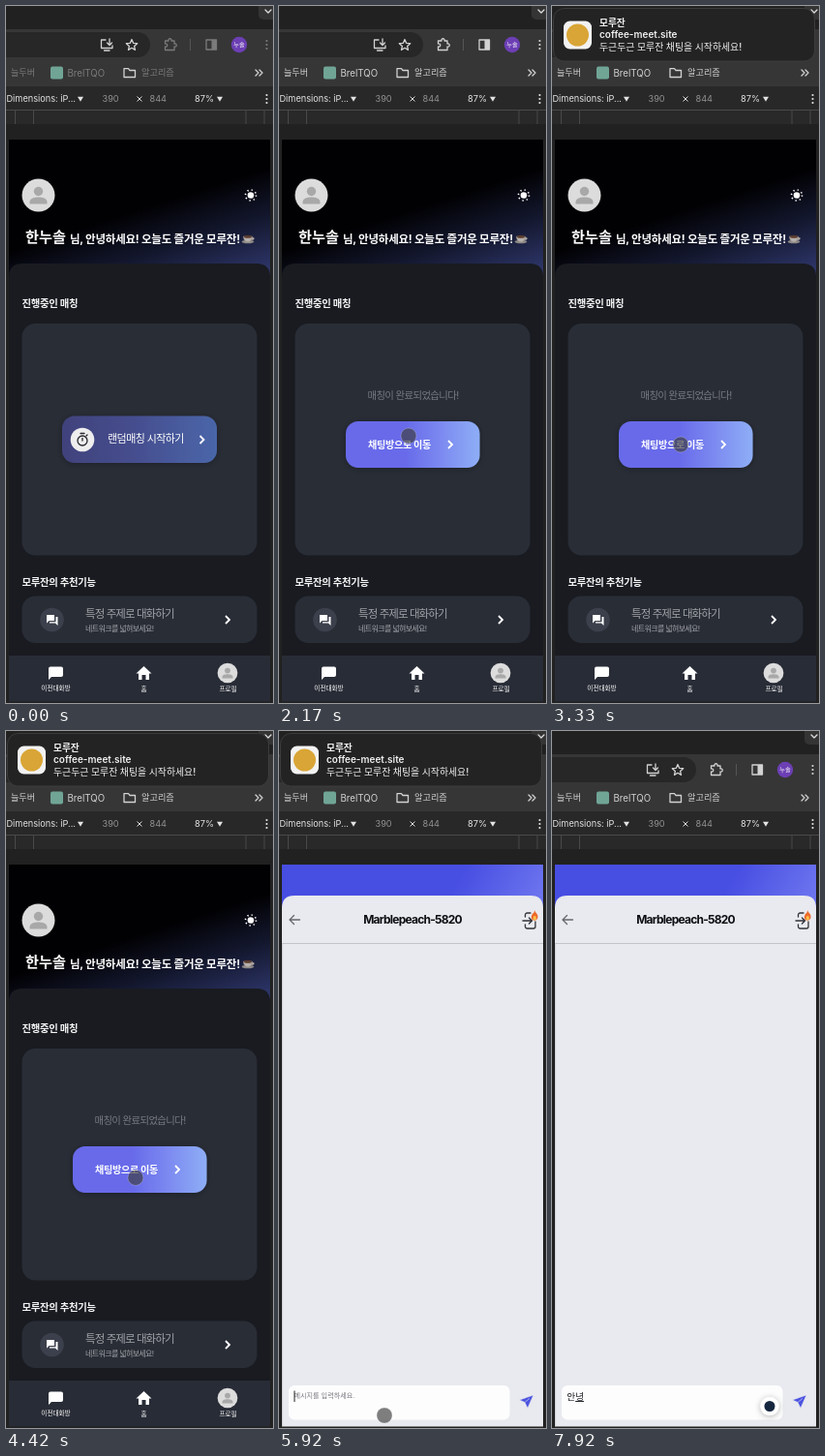
Recreate the animation shown at these times as an HTML page. Size 276x720 px, loop 8000 ms.

```html
<!DOCTYPE html>
<html lang="ko">
<head>
<meta charset="utf-8">
<style>
html, body { margin: 0; width: 100%; height: 100%; overflow: hidden; background: #212121; }
svg { display: block; width: 276px; height: 720px; font-family: Inter, 'Noto Sans CJK KR', 'Noto Sans CJK JP', sans-serif; --tool: #d2d2d2; }
svg.inactive { --tool: #7b7b7b; }
.tool { fill: var(--tool); }
.toolLine { stroke: var(--tool); }
.line { fill: none; stroke-width: 1.3; stroke-linejoin: round; stroke-linecap: round; }
.b { font-weight: 700; }
.m { font-weight: 500; }
.tight { letter-spacing: -.05em; }
.tighter { letter-spacing: -.08em; }
</style>
</head>
<body>
<svg id="stage" viewBox="0 0 276 720">
  <defs>
    <linearGradient id="night" gradientUnits="userSpaceOnUse" x1="100" y1="222" x2="130" y2="315">
      <stop stop-color="#010103"/><stop offset=".5" stop-color="#14182f"/><stop offset="1" stop-color="#2c3466"/>
    </linearGradient>
    <linearGradient id="day" gradientUnits="userSpaceOnUse" x1="170" y1="138" x2="262" y2="190">
      <stop offset=".2" stop-color="#474ee2"/><stop offset="1" stop-color="#6d75ef"/>
    </linearGradient>
    <linearGradient id="startFill"><stop stop-color="#41427c"/><stop offset=".5" stop-color="#454f90"/><stop offset="1" stop-color="#4a66a9"/></linearGradient>
    <linearGradient id="moveFill"><stop offset=".45" stop-color="#686bea"/><stop offset=".7" stop-color="#7b88f0"/><stop offset="1" stop-color="#8eaef6"/></linearGradient>
    <filter id="soft" x="-30%" y="-30%" width="160%" height="160%"><feDropShadow dx="0" dy="1" stdDeviation="3" flood-opacity=".3"/></filter>
    <g id="person">
      <circle r="17" fill="#dcdcdc"/><circle cy="-4" r="4.7" fill="#a8a8a8"/>
      <path d="M-9 9V7C-9 3-4 2 0 2S9 3 9 7V9Z" fill="#a8a8a8"/>
    </g>
    <path id="chevron" d="M-2-4L2 0L-2 4" fill="none" stroke="#fff" stroke-width="1.8"/>
    <path id="down" d="M-3-2.3H3L0 2.7Z"/>
    <g id="kebab"><circle cy="-4" r="1.1"/><circle r="1.1"/><circle cy="4" r="1.1"/></g>
  </defs>

  <!-- browser window -->
  <rect width="276" height="720" fill="#212121"/>
  <rect y="24" width="276" height="59" fill="#363636"/>
  <rect x="-30" y="27" width="179" height="26" rx="13" fill="#272727"/>
  <rect x="261" y="-6" width="22" height="20" rx="5" fill="#343434"/>
  <path class="line" d="M268 4L271 7L274 4" stroke="#ddd"/>
  <g class="line" stroke="#d2d2d2">
    <path d="M103 35H98.500V43.500H110V41M101.500 46H107M107 34V40M104.500 38L107 40.500L109.500 38"/>
    <path d="M130 34.500L131.600 38.300L135.700 38.700L132.600 41.400L133.500 45.400L130 43.300L126.500 45.400L127.400 41.400L124.300 38.700L128.400 38.300Z"/>
    <path d="M122 65V73.500H133.500V66.500H128L126.500 64.700H122Z"/>
    <path d="M258 66L261 69L258 72M262 66L265 69L262 72"/>
  </g>
  <g class="line toolLine">
    <path d="M164.500 36H168C167 33 172 33 171 36H174V39C177 38 177 43 174 42V45.500H164.500V42C167.500 42.500 167.500 38.500 164.500 39Z"/>
    <rect x="207" y="35" width="10.500" height="10"/>
  </g>
  <rect class="tool" x="212.500" y="35" width="5" height="10"/>
  <path d="M190.500 34V46" stroke="#555"/>
  <circle cx="241" cy="40" r="8.200" fill="#6c3fb4"/>
  <text class="m" x="241" y="42.300" font-size="6.200" fill="#fff" text-anchor="middle">누솔</text>
  <use class="tool" href="#kebab" x="269.500" y="40"/>
  <text class="tool" x="5" y="72.400" font-size="9.100">늘두버</text>
  <rect x="46" y="62.500" width="13" height="13" rx="2" fill="#70a596"/>
  <text class="tool" x="63.500" y="72.500" font-size="9.700">BrelTQO</text>
  <text class="tool" x="140" y="72.400" font-size="9.200">알고리즘</text>

  <rect y="83" width="276" height="24" fill="#282828"/>
  <g font-size="9.200" fill="#e4e4e4">
    <text x="72" y="99.300" text-anchor="end">Dimensions: iP...</text>
    <g fill="#929292"><text x="99.500" y="99.300">390</text><text x="148.500" y="99.300">844</text></g>
    <text x="195" y="99.300">87%</text>
    <path d="M135.500 93.500L140.500 98.500M140.500 93.500L135.500 98.500" stroke="#ddd"/>
    <use href="#down" x="77" y="96"/><use href="#down" x="221" y="96"/><use href="#kebab" x="269.500" y="96"/>
  </g>
  <rect y="107" width="276" height="15" fill="#292929"/>
  <path d="M0 107.500H276M9.500 107V122M28.500 107V122M248 107V122M267 107V122" stroke="#494949"/>

  <!-- home page -->
  <g id="home">
    <rect x="3" y="138" width="270" height="150" fill="url(#night)"/>
    <use href="#person" x="33.500" y="195.500"/>
    <circle cx="253" cy="195.500" r="3.300" fill="#fff"/>
    <circle cx="253" cy="195.500" r="5.500" fill="none" stroke="#fff" stroke-width="1.600" stroke-dasharray="1.300 3.020"/>
    <text class="b" x="20" y="243.700" font-size="15.200" fill="#fff">한누솔</text>
    <text class="b" x="66" y="244.500" font-size="11.500" fill="#fff" letter-spacing="-.02em">님, 안녕하세요! 오늘도 즐거운 모루잔!</text>
    <ellipse cx="250" cy="243.500" rx="6.300" ry="1.700" fill="#8f8a87"/>
    <path d="M245.500 238H254.500C254.500 246 245.500 246 245.500 238ZM254 239C258 239 257 242 253 242" fill="#b5afab" stroke="#8a8480" stroke-width=".6"/>
    <ellipse cx="250" cy="238.200" rx="4" ry="1.500" fill="#5a3c2e"/>
    <path d="M3 718V280Q3 266 17 266H259Q273 266 273 280V718Z" fill="#191b21"/>
    <g class="b" font-size="10.400" fill="#f4f4f4" letter-spacing="-.03em">
      <text x="16.500" y="311">진행중인 매칭</text>
      <text x="16.500" y="598.500">모루잔의 추천기능</text>
    </g>
    <rect x="16.500" y="328" width="243" height="239.500" rx="14" fill="#292d36"/>
    <g id="start">
      <rect x="58" y="423.500" width="160" height="48.500" rx="13" fill="url(#startFill)" filter="url(#soft)"/>
      <circle cx="79" cy="448" r="12.300" fill="#eee"/>
      <g class="line" stroke="#25272d"><circle cx="79" cy="449" r="5"/><path d="M77 441.500H81M79 446.500V449M83 444L84 443"/></g>
      <text class="m tight" x="105" y="451.200" font-size="11" fill="#fff">랜덤매칭 시작하기</text>
      <use href="#chevron" x="202.500" y="448"/>
    </g>
    <g id="done">
      <text x="138.500" y="406" font-size="10.400" letter-spacing="-.06em" fill="#787b81" text-anchor="middle">매칭이 완료되었습니다!</text>
      <rect x="69" y="429" width="138.500" height="48" rx="13" fill="url(#moveFill)" filter="url(#soft)"/>
      <text class="b" x="92" y="457" font-size="10.100" letter-spacing="-.03em" fill="#fff">채팅방으로 이동</text>
      <use href="#chevron" x="177" y="453"/>
    </g>
    <rect x="16.500" y="609.500" width="243" height="48.500" rx="14" fill="#292d36"/>
    <circle cx="47.500" cy="634" r="12.300" fill="#3c404c"/>
    <path d="M42 629H50V635H44.500L42 637.500ZM51.500 631H53.500V640L51 637.500H45V636.300H51.500Z" fill="#fff"/>
    <text class="tighter" x="82" y="632.300" font-size="11.500" fill="#a0a2a6">특정 주제로 대화하기</text>
    <text class="tighter" x="82" y="646" font-size="8" fill="#a0a2a6">네트워크를 넓혀보세요!</text>
    <use href="#chevron" x="229" y="634"/>
    <rect x="3" y="671" width="270" height="47.500" fill="#282c36"/>
    <path d="M46 682.500H57Q59 682.500 59 684.500V691Q59 693 57 693H47L44 696V684.500Q44 682.500 46 682.500ZM142.500 682L150.500 689.500H148V696H144.500V691H140.500V696H137V689.500H134.500Z" fill="#fff"/>
    <use href="#person" transform="translate(229 689) scale(.61)"/>
    <g class="m" font-size="6.600" fill="#fff" text-anchor="middle">
      <text x="51.500" y="707.300">이전대화방</text><text x="142.500" y="707.500">홈</text><text x="229.500" y="708.300">프로필</text>
    </g>
  </g>

  <!-- chat page -->
  <g id="chat">
    <rect x="3" y="138" width="270" height="60" fill="url(#day)"/>
    <path d="M3 718.500V183Q3 170 16 170H260Q273 170 273 183V718.500Z" fill="#e9eaef"/>
    <path d="M3 219.500H273" stroke="#c3c4ca"/>
    <path d="M3.500 220V718" stroke="#d3d4d9"/>
    <path class="line" d="M21.500 195H11.500M15.500 190.500L11 195L15.500 199.500" stroke="#66686e"/>
    <text class="b" x="138" y="199.300" font-size="12" letter-spacing="-.065em" fill="#0d0e12" text-anchor="middle">Marblepeach-5820</text>
    <path class="line" d="M254.500 192V190Q254.500 188 256.500 188H260M265 197V202Q265 204 263 204H256.500Q254.500 204 254.500 202V200M252 196H261.500M258.500 193L261.500 196L258.500 199" stroke="#303238" stroke-width="1.500"/>
    <path d="M264 185C265 188 268 188.500 267.500 192.500C267 197 260.500 196.500 260.800 192C261 190 262 190 262 188.500C263 189 264 187.500 264 185Z" fill="#ee6a2b"/>
    <ellipse cx="264.300" cy="193.300" rx="1.600" ry="2.200" fill="#fac04a"/>
    <rect x="10" y="676" width="228.500" height="35.500" rx="6" fill="#fdfdfe"/>
    <path d="M263 686L248.500 691L254 693.500L257 699.500ZM254 693.500L259 689.500" fill="#4c53e0" stroke="#e9eaef" stroke-width=".6"/>
    <text id="hint" x="15.500" y="688.800" font-size="7.100" fill="#77787d">메시지를 입력하세요.</text>
    <path id="caret" d="M16 681.500V693" stroke="#222"/>
    <text x="15.300" y="691" font-size="9.600" fill="#1b1c20"><tspan id="typed"></tspan><tspan id="composing" text-decoration="underline"></tspan></text>
    <g id="helper">
      <circle cx="225" cy="697.500" r="9.500" fill="#fff" filter="url(#soft)"/>
      <circle cx="225" cy="697.500" r="5.500" fill="#14273f"/>
    </g>
    <g id="status">
      <path d="M2 720V703H88Q92 703 92 707V720Z" fill="#202124"/>
      <text x="7" y="714.300" font-size="9.100" fill="#e4e4e4">요청을 처리하는 중...</text>
    </g>
  </g>

  <!-- notification banner -->
  <g id="banner">
    <rect x="1.500" y="2.500" width="270" height="54.500" rx="11" fill="#232324" stroke="#3c3c3e"/>
    <rect x="12" y="15.500" width="29" height="29" rx="6.500" fill="#f2f2f2"/>
    <circle cx="26.500" cy="30" r="11.500" fill="#d9a536"/>
    <g fill="#f1f1f1">
      <text class="b" x="49" y="20.600" font-size="9.700">모루잔</text>
      <text x="49" y="33.400" font-size="10" font-weight="600">coffee-meet.site</text>
      <text class="m" x="49" y="45.700" font-size="9.900">두근두근 모루잔 채팅을 시작하세요!</text>
    </g>
  </g>

  <path id="arrow" d="M0 0V11.500L2.700 9L4.600 13.300L6.700 12.400L4.800 8.300H8.400Z" fill="#000" stroke="#fff"/>
  <circle id="touch" r="8" fill="#3c3c3c" fill-opacity=".66" stroke="#fff" stroke-opacity=".22"/>
</svg>
<script>
const LOOP = 8000;
const el = id => document.getElementById(id);
const show = (id, on) => { el(id).style.display = on ? '' : 'none'; };
const place = (id, x, y) => el(id).setAttribute('transform', `translate(${x} ${y})`);
const clamp = v => Math.min(1, Math.max(0, v));
const progress = (t, from, to) => clamp((t - from) / (to - from));
const smooth = p => p * p * (3 - 2 * p);

const ACTIVATE = 1300, MATCHED = 1600, OPEN_CHAT = 4500, FOCUS = 5700, TYPE = 6900, HIDE_POINTER = 6350;

// [time, x, y]
const pointer = [
  [450, 148, 476], [950, 141, 451], [1350, 141, 451], [2000, 134, 444], [2400, 134, 444],
  [3200, 133, 453], [4000, 133, 453], [4500, 134, 462], [5000, 134, 462], [5600, 109, 707], [8000, 109, 707]
];
// [time, committed text, syllable being composed]
const typing = [
  [0, '', ''], [TYPE, '', 'ㅇ'], [7050, '', '아'], [7200, '', '안'],
  [7400, '안', 'ㄴ'], [7580, '안', '녀'], [7750, '안', '녕']
];

function pointerAt(t) {
  const i = Math.max(1, pointer.findIndex(p => p[0] >= t));
  const [t0, x0, y0] = pointer[i - 1], [t1, x1, y1] = pointer[i];
  const p = smooth(progress(t, t0, t1));
  return [x0 + (x1 - x0) * p, y0 + (y1 - y0) * p];
}

function draw(t) {
  el('stage').classList.toggle('inactive', t < ACTIVATE);
  show('home', t < OPEN_CHAT);
  show('start', t < MATCHED);
  show('done', t >= MATCHED);

  show('chat', t >= OPEN_CHAT);
  show('status', t < 5400);
  show('helper', t >= HIDE_POINTER);
  show('hint', t < TYPE);
  show('caret', t >= FOCUS && t < TYPE && (t - FOCUS) % 1000 < 500);
  const [, committed, composing] = typing.filter(k => k[0] <= t).pop();
  el('typed').textContent = committed;
  el('composing').textContent = composing;

  const enter = 1 - (1 - progress(t, 2780, 3220)) ** 3;
  const leave = progress(t, 7600, 7880) ** 2;
  place('banner', 290 * (1 - enter + leave), 0);

  const [x, y] = pointerAt(t);
  place('arrow', x, y);
  place('touch', x, y);
  show('arrow', t >= 450 && t < ACTIVATE);
  show('touch', t >= ACTIVATE && t < HIDE_POINTER);
}

const begin = performance.now();
function tick() {
  draw((performance.now() - begin) % LOOP);
  requestAnimationFrame(tick);
}
tick();
</script>
</body>
</html>
```
